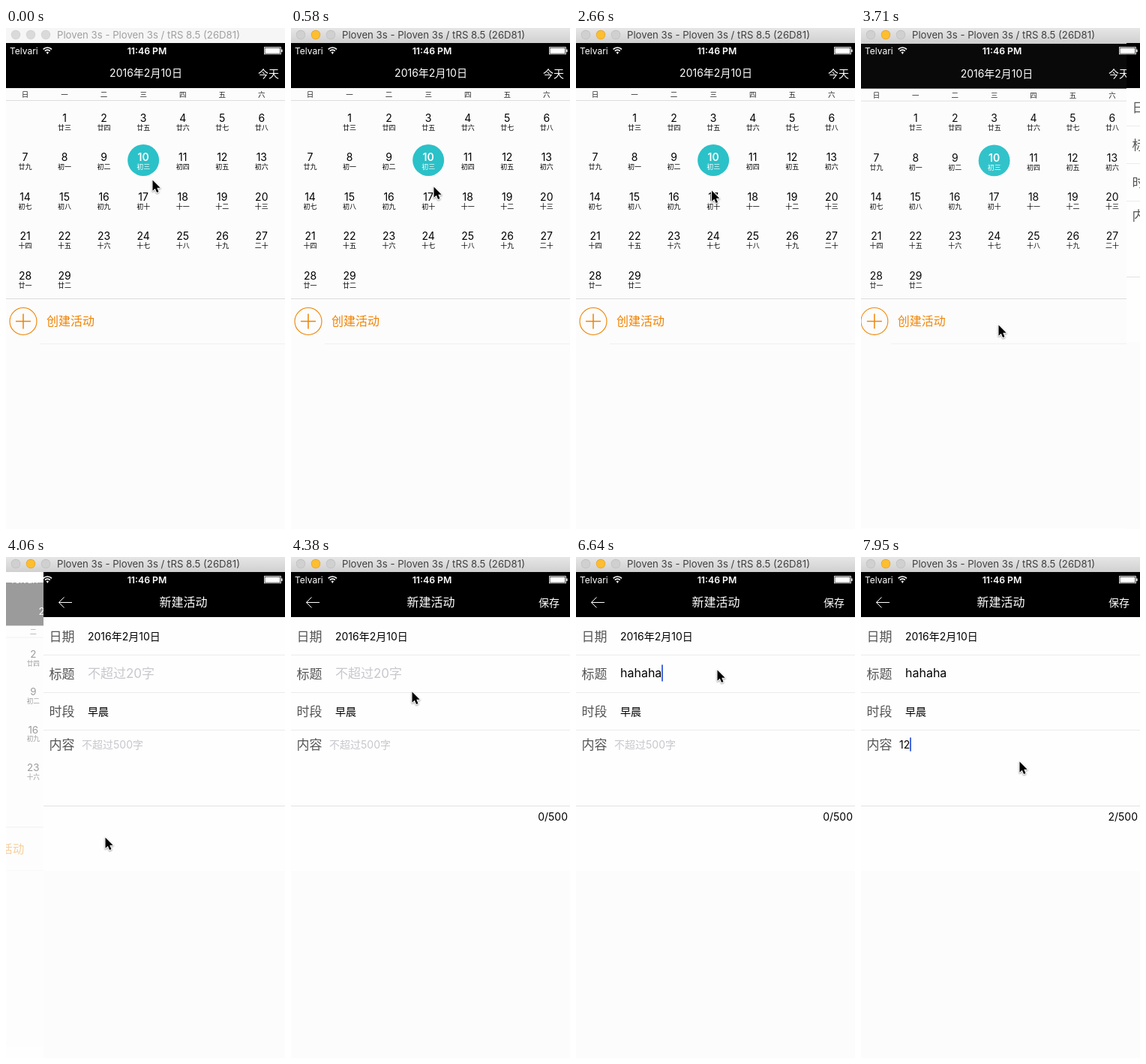
These frames come from a looping animation (372x667 px, 8 s). An HTML page with a canvas:

```html
<!DOCTYPE html>
<html lang="zh-CN">
<head>
<meta charset="utf-8">
<title>日历</title>
<style>
html, body { margin: 0; width: 100%; height: 100%; overflow: hidden; background: #fcfcfc; }
canvas { display: block; width: 372px; height: 667px; }
</style>
</head>
<body>
<canvas id="stage"></canvas>
<script>
const W = 372, H = 667, LOOP = 8000;
const canvas = document.getElementById('stage');
const ctx = canvas.getContext('2d');
const dpr = window.devicePixelRatio || 1;
canvas.width = W * dpr;
canvas.height = H * dpr;

const FONT = 'Inter, "Noto Sans CJK SC", "Noto Sans CJK", sans-serif';
const TEAL = '#2bc1c8', ORANGE = '#f08300', PAPER = '#fcfcfc';

const clamp = (v, lo = 0, hi = 1) => Math.min(hi, Math.max(lo, v));
const smooth = u => u * u * (3 - 2 * u);

// Pointer path: time, x, y
const POINTER = [
  [60, 195, 202], [580, 190, 211], [880, 190, 211], [1290, 174, 223],
  [1650, 174, 223], [1890, 180, 175], [2490, 180, 175], [3110, 183, 395],
  [3710, 183, 395], [4060, 132, 373], [4380, 161, 179], [4440, 164, 178],
  [4600, 164, 178], [4720, 188, 150], [6930, 188, 150], [7350, 211, 272]
];

function pointerAt(t) {
  const i = POINTER.findIndex(k => k[0] > t);
  if (i === 0) return POINTER[0].slice(1);
  if (i < 0) return POINTER[POINTER.length - 1].slice(1);
  const [t0, x0, y0] = POINTER[i - 1], [t1, x1, y1] = POINTER[i];
  const u = smooth((t - t0) / (t1 - t0));
  return [x0 + (x1 - x0) * u, y0 + (y1 - y0) * u];
}

function rect(color, x, y, w, h) {
  ctx.fillStyle = color;
  ctx.fillRect(x, y, w, h);
}

function disc(color, x, y, r) {
  ctx.fillStyle = color;
  ctx.beginPath();
  ctx.arc(x, y, r, 0, Math.PI * 2);
  ctx.fill();
}

function lines(color, width, ...paths) {
  ctx.strokeStyle = color;
  ctx.lineWidth = width;
  ctx.beginPath();
  for (const path of paths)
    path.forEach(([x, y], i) => i ? ctx.lineTo(x, y) : ctx.moveTo(x, y));
  ctx.stroke();
}

// y is the visual middle of the glyphs
function text(str, x, y, size, color, align = 'left', weight = 400) {
  ctx.font = `${weight} ${size}px ${FONT}`;
  ctx.textAlign = align;
  ctx.fillStyle = color;
  ctx.fillText(str, x, y + size * 0.37);
}

function titleBar(active) {
  if (active) {
    const g = ctx.createLinearGradient(0, 0, 0, 20);
    g.addColorStop(0, '#e6e6e6');
    g.addColorStop(1, '#d0d0d0');
    rect(g, 0, 0, W, 20);
  } else {
    rect('#f6f6f6', 0, 0, W, 20);
  }
  for (let i = 0; i < 3; i++) {
    const x = 13 + i * 20;
    const lit = active && i === 1;
    disc(lit ? '#e0a127' : active ? '#bcbcbc' : '#d0d0d0', x, 9, 6.2);
    disc(lit ? '#fdbe2f' : active ? '#d0d0d0' : '#dadada', x, 9, 5.6);
  }
  text('Ploven 3s - Ploven 3s / tRS 8.5 (26D81)', 68, 9.3, 13.2, active ? '#404040' : '#a0a0a0');
}

function statusBar() {
  text('Telvari', 5, 30.3, 12, '#fff');
  text('11:46 PM', 188, 30.3, 12.3, '#fff', 'center', 600);
  ctx.strokeStyle = '#fff';
  ctx.lineWidth = 1.7;
  for (const r of [4.9, 8]) {
    ctx.beginPath();
    ctx.arc(55.3, 34, r, -Math.PI * 0.75, -Math.PI * 0.25);
    ctx.stroke();
  }
  ctx.fillStyle = '#fff';
  ctx.beginPath();
  ctx.moveTo(55.3, 35);
  ctx.arc(55.3, 34, 2.4, -Math.PI * 0.75, -Math.PI * 0.25);
  ctx.fill();
  ctx.lineWidth = 0.8;
  ctx.strokeRect(344.4, 25.6, 22, 9.2);
  rect('#fff', 345.4, 26.6, 20, 7.2);
  rect('#fff', 367.2, 28.5, 1.4, 3.6);
}

function lunar(day) {
  const n = day < 8 ? day + 22 : day - 7;
  if (n === 10) return '初十';
  if (n === 20) return '二十';
  return '初十廿'[Math.floor(n / 10)] + '一二三四五六七八九'[n % 10 - 1];
}

// Selected day, header day and circle opacity
function selection(t) {
  const fade = t0 => clamp(0.6 + (t - t0 - 90) / 150, 0.6, 1);
  if (t < 1350) return { head: 10, day: 10, alpha: 1 };
  if (t < 1590) return { head: 10, day: 0 };
  if (t < 1950) return { head: 17, day: 17, alpha: fade(1590) };
  if (t < 2430) return { head: 17, day: 0 };
  return { head: 10, day: 10, alpha: fade(2430) };
}

function calendarPage(t) {
  const { head, day: picked, alpha } = selection(t);
  rect(PAPER, 0, 20, W, H - 20);
  rect('#000', 0, 20, W, 60);
  text(`2016年2月${head}日`, 186.5, 60, 14, '#fff', 'center');
  text('今天', 336, 60.5, 14, '#fff');

  const colX = c => 25.5 + c * 52.55;
  [...'日一二三四五六'].forEach((d, c) => text(d, colX(c), 88.5, 9.5, '#222', 'center'));
  rect('#dedede', 0, 96, W, 1);
  for (let day = 1; day <= 29; day++) {
    const x = colX(day % 7), y = 119.5 + Math.floor(day / 7) * 52.5;
    const on = day === picked;
    if (on) {
      ctx.globalAlpha = alpha;
      disc(TEAL, x, y + 4, 21);
      ctx.globalAlpha = 1;
    }
    const ink = on ? '#fff' : '#000';
    text(day, x, y, 14, ink, 'center', on ? 600 : 400);
    text(lunar(day), x, y + 13, 9, ink, 'center');
  }

  rect('#dcdcdc', 0, 360, W, 1);
  rect('#f0f0f0', 45, 420, W - 45, 1);
  ctx.strokeStyle = ORANGE;
  ctx.lineWidth = 1.1;
  ctx.beginPath();
  ctx.arc(23, 390.5, 18, 0, Math.PI * 2);
  ctx.stroke();
  lines(ORANGE, 1.5, [[13, 390.5], [33, 390.5]], [[23, 380.5], [23, 400.5]]);
  text('创建活动', 54, 390.5, 16, ORANGE, 'left', 500);
}

function field(value, hint, x, y, size, hintSize, caret) {
  if (value) text(value, x, y, size, '#000');
  else text(hint, x, y, hintSize, '#c7c7cd');
  if (!caret) return;
  ctx.font = `400 ${size}px ${FONT}`;
  const cx = Math.round(x + (value ? ctx.measureText(value).width - 0.5 : 0));
  const h = hintSize * 1.3;
  rect('#4469e0', cx, y - h / 2, 2, h);
}

function formPage(t) {
  rect(PAPER, 0, 20, W, H - 20);
  rect('#fefefe', 0, 80, W, 338);
  rect('#000', 0, 20, W, 60);
  lines('#fff', 1, [[38, 60.5], [20.5, 60.5]], [[27.5, 53.5], [20.5, 60.5], [27.5, 67.5]]);
  text('新建活动', 186.5, 60.5, 16, '#fff', 'center', 500);
  text('保存', 330, 60.5, 14, '#fff');

  const GREY = '#555';
  text('日期', 7.5, 105.5, 17, GREY);
  text('标题', 7.5, 155.5, 17, GREY);
  text('时段', 7.5, 205.5, 17, GREY);
  text('内容', 7.5, 250, 17, GREY);
  for (const y of [130, 180, 230]) rect('#ebebeb', 0, y, W, 1);
  rect('#e2e2e2', 0, 331, W, 1);

  text('2016年2月10日', 59, 105.5, 14, '#000');
  text('早晨', 59, 206, 14, '#000');

  const letters = t < 5980 ? 0 : clamp(Math.floor((t - 5980) / 115) + 1, 0, 6);
  field('hahaha'.slice(0, letters), '不超过20字', 59, 154.5, 16, 17, t >= 5380 && t < 7050);
  const digits = t < 7890 ? 0 : t < 7950 ? 1 : 2;
  field('12'.slice(0, digits), '不超过500字', 51, 249.5, 14, 14, t >= 7530);
  text(`${digits}/500`, 369, 346, 14, '#000', 'right');
}

function screen(t) {
  const p = t < 3710 ? 0 : smooth(clamp((t - 3637) / 550));
  ctx.save();
  ctx.beginPath();
  ctx.rect(0, 20, W, H - 20);
  ctx.clip();
  if (p < 1) {
    // The page beneath slides, shrinks and fades
    const s = 1 - 0.05 * p;
    rect('#fdfdfd', 0, 20, W, H - 20);
    ctx.save();
    ctx.translate(W / 2 - 0.3 * W * p, 343.5);
    ctx.scale(s, s);
    ctx.translate(-W / 2, -343.5);
    calendarPage(t);
    ctx.restore();
    if (p > 0) rect(`rgba(255,255,255,${0.7 * p})`, 0, 20, W, H - 20);
  }
  if (p > 0) {
    ctx.translate(Math.round(W * (1 - p)), 0);
    formPage(t);
  }
  ctx.restore();
  statusBar();
}

function pointer(x, y) {
  const shape = [[0, 0], [0, 14.2], [3.3, 11.2], [5.6, 16.5], [8, 15.5], [5.8, 10.3], [10.2, 10.3]];
  ctx.save();
  ctx.translate(x + 0.5, y + 0.5);
  ctx.beginPath();
  shape.forEach(([px, py]) => ctx.lineTo(px, py));
  ctx.closePath();
  ctx.lineJoin = 'round';
  ctx.lineWidth = 2;
  ctx.strokeStyle = '#fff';
  ctx.shadowColor = 'rgba(0,0,0,.4)';
  ctx.shadowBlur = 2 * dpr;
  ctx.shadowOffsetY = dpr;
  ctx.stroke();
  ctx.shadowColor = 'transparent';
  ctx.fillStyle = '#000';
  ctx.fill();
  ctx.restore();
}

function draw(t) {
  ctx.setTransform(dpr, 0, 0, dpr, 0, 0);
  titleBar(t >= 460);
  screen(t);
  pointer(...pointerAt(t));
}

const start = performance.now();
function tick() {
  draw((performance.now() - start) % LOOP);
  requestAnimationFrame(tick);
}
tick();
</script>
</body>
</html>
```
